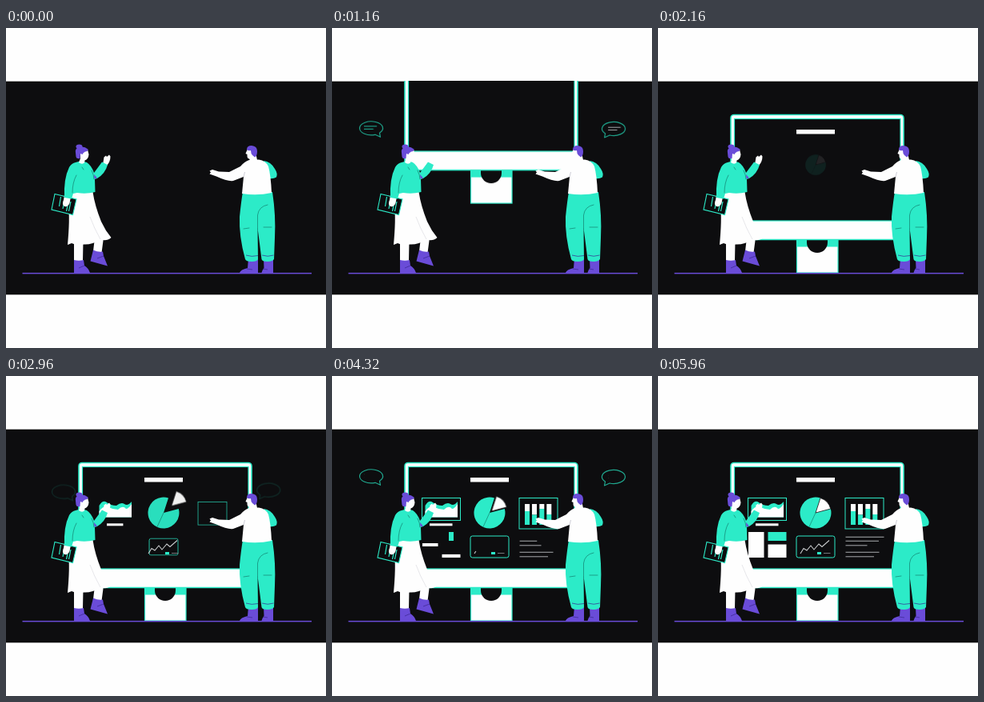
Write an HTML page that moves like this. It is 400 px wide and 400 px high and loops after 6040 ms.

```html
<!DOCTYPE html>
<html lang="en">
<head>
<meta charset="utf-8">
<title>Dashboard presentation</title>
<style>
  :root { --ink: #0d0d0f; --teal: #2cebc8; --violet: #6a4cd8; --paper: #fefefe; }
  html, body { margin: 0; width: 100%; height: 100%; overflow: hidden; background: var(--paper); }
  svg { display: block; width: 100vw; height: 100vh; }

  .ink { fill: var(--ink); }
  .teal { fill: var(--teal); }
  .violet { fill: var(--violet); }
  .white { fill: var(--paper); }
  .line { fill: none; stroke: var(--teal); }
  .seam { fill: none; stroke: #14806f; stroke-width: .7; stroke-linecap: round; }
  .fold { fill: none; stroke: #3a2790; stroke-width: .7; }

  /* One shared loop; every part only names its own keyframes */
  .a {
    animation: 6.04s cubic-bezier(.37, 0, .63, 1) infinite;
    transform-box: fill-box;
    transform-origin: center;
  }
  .left { transform-origin: left center; }
  .base { transform-origin: center bottom; }

  .drop { animation-name: drop; }
  @keyframes drop { 0%, 5.4% { transform: translateY(-266px); } 28%, 100% { transform: none; } }

  .title { animation-name: title; }
  @keyframes title { 0%, 29.1% { transform: scaleX(0); } 36.4%, 100% { transform: none; } }
  .pie { animation-name: pie, fade; }
  @keyframes pie { 0%, 31.8% { transform: scale(0); } 38.4%, 100% { transform: none; } }
  @keyframes fade { 0%, 31.8% { opacity: 0; } 52%, 100% { opacity: 1; } }
  .slice { animation-name: slice; }
  @keyframes slice {
    0%, 38.4%, 67.05%, 68.2%, 96.85%, 100% { transform: none; }
    48.3%, 57.1%, 78.15%, 86.9% { transform: translate(9.8px, -8.5px); }
  }

  .area { animation-name: area; }
  @keyframes area { 0%, 38% { transform: scale(0); } 46.4%, 100% { transform: none; } }
  .frame { animation-name: frame; }
  @keyframes frame { 0%, 49% { transform: scale(.8); opacity: 0; } 56.3%, 100% { transform: none; opacity: 1; } }
  .caption { animation-name: caption; }
  @keyframes caption { 0%, 43.7% { transform: scaleX(0); } 52%, 100% { transform: none; } }
  .panel { animation-name: panel; }
  @keyframes panel { 0%, 43.5% { transform: scale(0); opacity: .2; } 51.8%, 100% { transform: none; opacity: 1; } }
  .card { animation-name: card; }
  @keyframes card { 0%, 43.5% { transform: scale(0); } 51.8%, 100% { transform: none; } }
  .mark { animation-name: mark; }
  @keyframes mark { 0%, 43% { transform: scale(0); } 47%, 100% { transform: none; } }

  .bar1 { animation-name: bar1; }
  .bar2 { animation-name: bar2; }
  .bar3 { animation-name: bar3; }
  .bar4 { animation-name: bar4; }
  @keyframes bar1 { 0%, 52% { transform: scaleY(0); } 59%, 100% { transform: none; } }
  @keyframes bar2 { 0%, 53.5% { transform: scaleY(0); } 60.5%, 100% { transform: none; } }
  @keyframes bar3 { 0%, 55% { transform: scaleY(0); } 62%, 100% { transform: none; } }
  @keyframes bar4 { 0%, 56.5% { transform: scaleY(0); } 63.5%, 100% { transform: none; } }

  .row1 { animation-name: row1; }
  .row2 { animation-name: row2; }
  .row3 { animation-name: row3; }
  .row4 { animation-name: row4; }
  .row5 { animation-name: row5; }
  @keyframes row1 { 0%, 72.2% { transform: scaleX(0); } 78%, 100% { transform: none; } }
  @keyframes row2 { 0%, 68.5% { transform: scaleX(0); } 74.4%, 100% { transform: none; } }
  @keyframes row3 { 0%, 63.7% { transform: scaleX(0); } 69.5%, 100% { transform: none; } }
  @keyframes row4 { 0%, 58.3% { transform: scaleX(0); } 64%, 100% { transform: none; } }
  @keyframes row5 { 0%, 54.6% { transform: scaleX(0); } 60.4%, 100% { transform: none; } }

  .tall { animation-name: tall; }
  .wide { animation-name: wide; }
  .rise { animation-name: rise; }
  @keyframes tall { 0%, 69.5% { transform: scaleY(0); } 78.6%, 100% { transform: none; } }
  @keyframes wide { 0%, 68.4% { transform: scaleX(0); } 77.8%, 100% { transform: none; } }
  @keyframes rise { 0%, 68.4% { transform: scaleY(0); } 77.8%, 100% { transform: none; } }

  .trend { stroke-dasharray: 1 2; animation-name: trend; animation-timing-function: linear; }
  @keyframes trend {
    0%, 38%, 64.6%, 70% { stroke-dashoffset: 1.01; }
    48%, 58%, 90.7%, 100% { stroke-dashoffset: 0; }
  }

  .bubble { animation-name: bubble; }
  @keyframes bubble {
    0%, 2%, 31.5%, 47.2%, 97.5%, 100% { transform: translate(var(--x), var(--y)); opacity: 0; }
    10%, 18%, 53.2%, 92% { transform: none; opacity: 1; }
    24.5% { transform: translate(calc(var(--x) * -.04), calc(var(--y) * -.05)); opacity: 1; }
  }
  .talk { animation-name: talk; }
  @keyframes talk {
    0%, 10%, 23.5%, 71%, 92%, 100% { transform: scaleX(0); }
    14%, 18.5%, 79%, 89% { transform: none; }
  }
</style>
</head>
<body>
<svg viewBox="0 0 400 400">
  <defs>
    <clipPath id="band"><rect y="66.67" width="400" height="266.67"/></clipPath>
    <path id="balloon" d="M5 8A14.5 8.5 0 1 1 10.5 5.9L11.5 11Z" fill="none" stroke="#20a88f" stroke-width="1.2" stroke-linejoin="round"/>
  </defs>

  <rect class="ink" y="66.67" width="400" height="266.67"/>
  <g clip-path="url(#band)">

    <!-- Monitor -->
    <g class="a drop">
      <rect class="white" x="173.5" y="264" width="51.5" height="42"/>
      <rect class="teal" x="173.5" y="264" width="51.5" height="9.5"/>
      <path class="ink" d="M186 265V268A13 13 0 0 0 212 268V265Z"/>
      <rect class="line" x="173.5" y="264" width="51.5" height="42" stroke-width="1.2"/>
      <rect class="white" x="91" y="108.5" width="216" height="156" rx="4" stroke="#2cebc8" stroke-width="1.6"/>
      <rect class="ink" x="95.5" y="113.5" width="207.5" height="127.5" stroke="#2cebc8" stroke-width="1.2"/>
    </g>

    <!-- Screen content -->
    <rect class="a title white" x="173" y="127" width="48" height="5.5"/>

    <g class="a pie">
      <path class="teal" d="M197 171L215.8 166A19.5 19.5 0 1 1 203 152.5Z"/>
      <path class="seam" d="M197 171L189 188.5"/>
      <path class="a slice white" d="M197 171L203 152.5A19.5 19.5 0 0 1 215.8 166Z" stroke="#0d0d0f" stroke-width=".7"/>
    </g>

    <rect class="a frame line" x="112.5" y="152.5" width="48" height="28"/>
    <g class="a area">
      <path class="teal" d="M116.5 162Q121 154 126 158T138 162Q144 157 148 160Q152 163 157 157V176.5H116.5Z"/>
      <path class="white" d="M116.5 169Q122 161 128 164T140 167Q146 161 150 166Q153 166 157 160V176.5H116.5Z"/>
    </g>
    <rect class="a caption white" x="122" y="184.3" width="28.5" height="3"/>

    <rect class="a tall white" x="113" y="195" width="19.5" height="32"/>
    <rect class="a wide teal" x="137.5" y="195" width="23" height="11"/>
    <rect class="a rise base white" x="137.5" y="210.5" width="23" height="16.5"/>

    <rect class="a panel line" x="234" y="152.5" width="48" height="38.5"/>
    <g class="a bar1 base">
      <rect class="white" x="241" y="160" width="6" height="9"/>
      <rect class="teal" x="241" y="169" width="6" height="17"/>
    </g>
    <g class="a bar2 base">
      <rect class="white" x="250" y="160" width="6" height="13.5"/>
      <rect class="teal" x="250" y="173.5" width="6" height="12.5"/>
    </g>
    <g class="a bar3 base">
      <rect class="white" x="259.3" y="160" width="6" height="6"/>
      <rect class="teal" x="259.3" y="166" width="6" height="20"/>
    </g>
    <g class="a bar4 base">
      <rect class="white" x="268.3" y="160" width="6" height="13"/>
      <rect class="teal" x="268.3" y="173" width="6" height="13"/>
    </g>

    <rect class="a card line" x="173" y="200" width="48" height="27" rx="2.5"/>
    <path class="a trend" pathLength="1" d="M178 222L182 215.5L186 218L191 212L195 217L201 210L205 213.5L214 205.5" fill="none" stroke="#c9cbcd" stroke-width="1.1"/>
    <rect class="a mark teal" x="199" y="220" width="5" height="3"/>
    <rect class="a mark" x="207" y="221" width="8.5" height="1" fill="#74777a"/>

    <g fill="#85878a">
      <rect class="a row1 left" x="234.5" y="200.7" width="48" height="1.3"/>
      <rect class="a row2 left" x="234.5" y="205.7" width="41.5" height="1.3"/>
      <rect class="a row3 left" x="234.5" y="211.1" width="27" height="1.3"/>
      <rect class="a row4 left" x="234.5" y="219.7" width="42" height="1.3"/>
      <rect class="a row5 left" x="234.5" y="225.1" width="35.5" height="1.3"/>
    </g>

    <!-- Speech bubbles -->
    <g class="a bubble" style="--x: 29px; --y: 24.5px">
      <use href="#balloon" x="49" y="125.3"/>
      <g fill="#20a88f">
        <rect class="a talk left" x="40" y="122.3" width="17" height="1.1"/>
        <rect class="a talk left" x="40" y="125.8" width="12.5" height="1.1"/>
      </g>
    </g>
    <g class="a bubble" style="--x: -30px; --y: 21px">
      <use href="#balloon" transform="translate(352 126) scale(-1 1)"/>
      <g fill="#999c9e">
        <rect class="a talk left" x="345" y="123.7" width="16.5" height="1.1"/>
        <rect class="a talk left" x="345" y="127" width="12" height="1.1"/>
      </g>
    </g>

    <rect class="violet" x="20.5" y="305.9" width="361.5" height="1.5"/>

    <!-- Woman -->
    <g>
      <path class="white" d="M85 266H96.5L96 291H85ZM111 262H122L119.5 281L109 279Z"/>
      <path class="violet" d="M85 290Q91 291.5 97 290L98 297Q103 300 105 306H85ZM109 277.5Q115 280.5 121 279.5L122 285L127 297.5L105.5 291.5Z"/>
      <path class="fold" d="M91 300L98 297M114 288L122 285"/>
      <path class="white" d="M83 206L108.5 205Q111 222 119 242Q124 253 131.5 262Q126 267 118 264.5Q108 271 97 270.5Q90 273 82 269L77 271Q80 238 78 224Z"/>
      <path d="M105 236Q110 250 118 264" fill="none" stroke="#d5d5dc" stroke-width=".6"/>
      <path class="ink" d="M61 207.5L88 214L83.5 233.5L57 227Z" stroke="#2cebc8" stroke-width="1.1"/>
      <path class="line" d="M68.5 211L66.5 223M72 221L71 226M77 222L75.5 229M81 217L78.5 229" stroke-width="1.2"/>
      <path class="white" d="M73 209L81 211L79.5 219Q77.5 224 73 223Q69.5 220 72 215Z"/>
      <path class="white" d="M121 171L122.5 161.5L125 159.5L126 161L129 158.5L130.5 160.5Q130.5 167 126 172Z"/>
      <path class="teal" d="M87 168Q94 165.5 101 168Q107 172 110 181L120 167.5L127 171Q124 182 114 188L111 189L111.5 205Q100 208 89 206L84 207L82 213.5L73 212Q72 188 79 174Q82 169 87 168Z"/>
      <path class="seam" d="M88 184Q83 193 83 206M107 178Q110 184 110 189M95 174L97 177"/>
      <path class="violet" d="M110 183L114 187.5L110.5 188.5Z"/>
      <path class="white" d="M93 155L102 152L103.5 158Q103 164 98.5 165.5L98 168.5Q95 171 91 168L93 163Z"/>
      <path class="violet" d="M87 156Q86 151 90 149.5Q97 147 102.5 151.5Q103 154 99 154.5Q96 156 95.5 158L93 157L92.5 163Q88 164 87.5 161Z"/>
      <ellipse class="violet" cx="91.5" cy="148.3" rx="4" ry="2.8"/>
    </g>

    <!-- Man -->
    <g>
      <path class="teal" d="M322 166Q331 167 336 176Q340 182 338 186.5Q334 189 329 188Z"/>
      <path class="violet" d="M303 288H315V306H292Q293 302 302 300ZM322 288H334V306H319.5Q320 303 322.5 300Z"/>
      <path class="fold" d="M301 301L308 302M321 301L327 302"/>
      <path class="teal" d="M296 205H333Q337.5 235 336 262L335 289Q333 292 327 292Q320 292 319.5 289L314.5 250L315 289Q314 292 307 292Q300 292 299 289Q291 260 292 236Q294 216 296 205Z"/>
      <path class="fold" d="M300 284Q307 286.5 315 284.5M320 284Q327 286.5 334.5 284"/>
      <path class="seam" d="M327 221Q316 223 314.5 234V252M297 251L304 250M322 249H332"/>
      <path class="white" d="M304 165Q298 167 293 173L279 180L266 179.5L258 177L254.5 178.5L256 180.5L254.5 182.5L263 185.5Q277 192 284 191L297 186L295 207Q314 210 332 206Q331 184 328 173Q325 166 316 164.5Z"/>
      <path d="M297 186L298.5 180" fill="none" stroke="#b9b9c4" stroke-width=".7"/>
      <path class="white" d="M302 151L299.5 157L301.5 158Q301 163 304 163.5L306 167L314 165L312 156Z"/>
      <path class="violet" d="M301 152Q301 147 307 147Q314 147.5 314 154Q314 160 311 161.5L308 159Q306 157 306 153Q303 154 301 152Z"/>
    </g>
  </g>
</svg>
</body>
</html>
```
